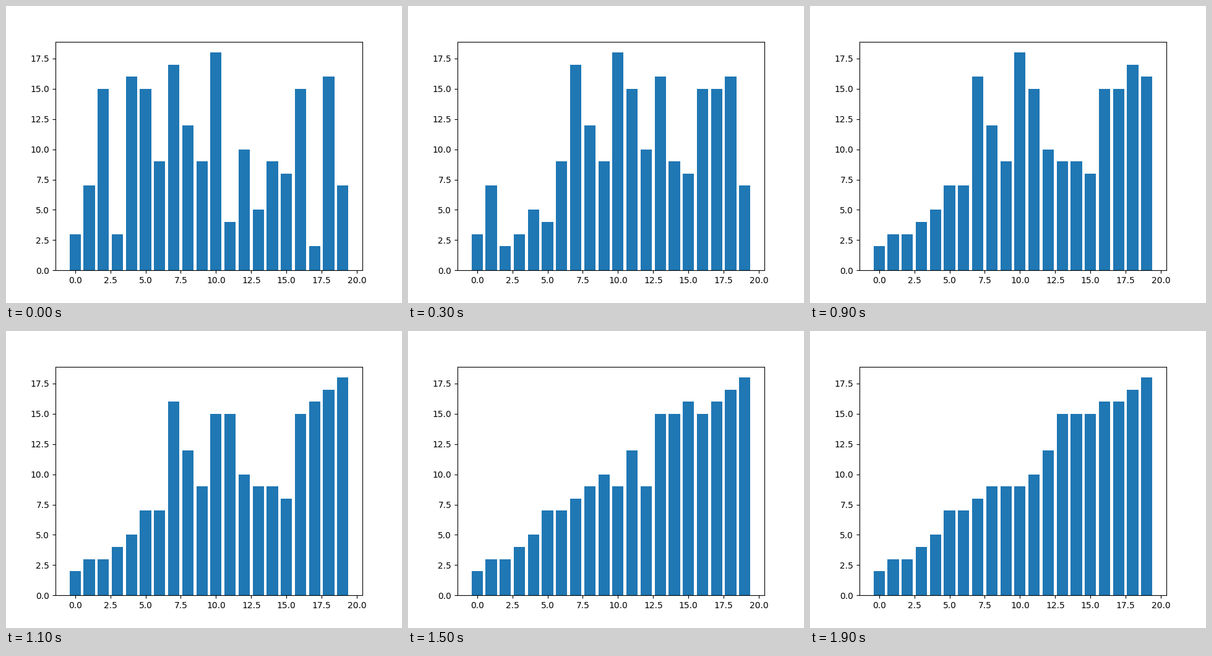
A matplotlib script for the animation above (2 s loop, 640 by 480 pixels).

```python
import matplotlib.pyplot as plt
from matplotlib.animation import FuncAnimation

START = [3, 16, 15, 3, 16, 15, 9, 17, 12, 9, 18, 4, 10, 5, 9, 8, 15, 2, 7, 7]
INTERVAL = 100


def swap(a, i, j):
    a[i], a[j] = a[j], a[i]


def quicksort(a, lo, hi):
    """Sort in place with a median-of-three pivot, yielding after each swap."""
    if lo >= hi:
        return
    trio = (lo, (lo + hi) // 2, hi)
    swap(a, sorted(trio, key=lambda k: a[k])[1], hi)
    pivot = a[hi]
    i, j = lo, hi - 1
    while True:
        while a[i] < pivot:
            i += 1
        while j > lo and a[j] > pivot:
            j -= 1
        if i >= j:
            break
        swap(a, i, j)
        yield a[:]
        i, j = i + 1, j - 1
    swap(a, i, hi)
    yield a[:]
    yield from quicksort(a, lo, i - 1)
    yield from quicksort(a, i + 1, hi)


def sort_states(values):
    """Keep only the steps that visibly change the bars."""
    states, last = [], values
    for state in quicksort(values[:], 0, len(values) - 1):
        if state != last:
            states.append(state)
            last = state
    return states


states = sort_states(START)

fig, ax = plt.subplots(figsize=(6.4, 4.8), dpi=100)
bars = ax.bar(range(len(START)), states[0])


def update(n):
    for bar, height in zip(bars, states[n]):
        bar.set_height(height)
    return bars.patches


anim = FuncAnimation(fig, update, frames=len(states), interval=INTERVAL,
                     repeat=True, repeat_delay=0)
plt.show()
```
